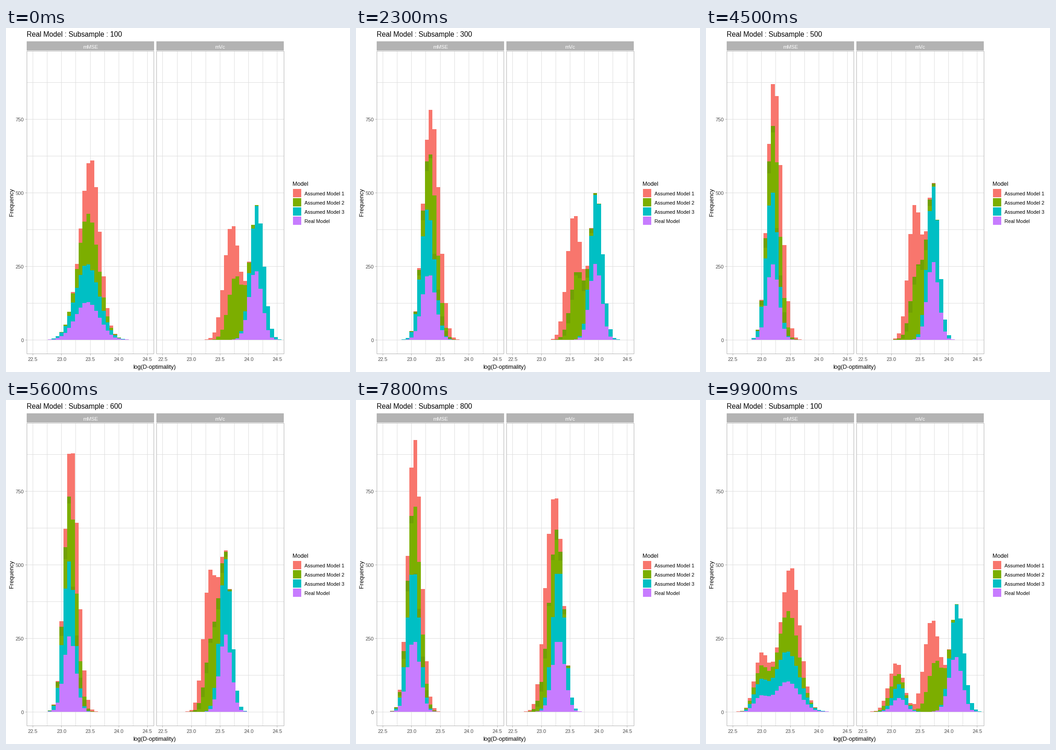
Animation, 748 px wide and 748 px high, one loop 10000 ms. Source, as a matplotlib script:

```python
import numpy as np
import matplotlib.pyplot as plt
from matplotlib.animation import FuncAnimation
from matplotlib.patches import Rectangle

SIZE = 748
PX = 0.72                        # points per pixel at 100 dpi
RED, GREEN, TEAL, PURPLE = "#F8766D", "#7CAE00", "#00BFC4", "#C77CFF"
OLIVE, GREY, GRID, INK = "#729F05", "#B3B3B3", "#DEDEDE", "#4D4D4D"
MODELS = {"Assumed Model 1": RED, "Assumed Model 2": GREEN,
          "Assumed Model 3": TEAL, "Real Model": PURPLE}

BINS = np.arange(30)
BIN_W = 8.37
SHIFT = 282.4                    # distance between the two panels
Y0, Y_SCALE = 678, 0.64
RUNS = 1000                      # simulations behind each model
STATES = 9

# Per model: start of the mean, its slope and bend per step, its early extra,
# the base spread and its early extra, all in bins.
MMSE = [(14.22, -0.758, -0.030, 0.00, 1.61, 0.1),
        (13.22, -0.902, 0.000, 0.00, 1.63, 0.5),
        (11.30, -0.700, 0.000, 1.36, 1.53, 1.4),
        (12.10, -0.785, 0.000, 0.66, 1.53, 1.4)]
MVC = [(15.79, -0.90, -0.033, 0, 1.60, 0),
       (17.54, -1.00, -0.044, 0, 1.67, 0),
       (23.50, -1.30, -0.080, 0, 1.55, 0),
       (22.67, -1.10, -0.091, 0, 1.50, 0)]


def bell(k, start, slope, bend, extra, spread, wide):
    """Expected bin counts of one model at subsample step k."""
    mean = start + slope * k + bend * k**2 + extra * np.exp(-2 * k)
    sd = spread + 0.011 * (k - 4) ** 2 + wide * np.exp(-k)
    counts = RUNS / (sd * np.sqrt(2 * np.pi)) * np.exp(-((BINS - mean) / sd) ** 2 / 2)
    return np.round(counts)


def layers(table, k, two_sided):
    """Stacked tops of the four models, then the low and high edge of the overlap."""
    counts = np.array([bell(k, *row) for row in table])
    tops = np.cumsum(counts[::-1], axis=0)[::-1]
    green = counts[1]
    slope = np.gradient(green)
    depth = np.minimum(np.abs(slope) / 2, green) * (2 <= k <= 7)
    low = np.where(two_sided & (slope < 0), tops[2], tops[1] - depth)
    return np.vstack([tops, low, low + depth])


DATA = [[layers(table, k, table is MMSE) for k in range(STATES)]
        for table in (MMSE, MVC)]
STEPS = [6, 6] + [5] * 7         # frames in each change
HOLD = 6                         # still frames between changes
STARTS = np.cumsum([HOLD] + [n + HOLD for n in STEPS[:-1]])

plt.rcParams["font.family"] = "Liberation Sans"
fig = plt.figure(figsize=(SIZE / 100, SIZE / 100), dpi=100, facecolor="white")
ax = fig.add_axes([0, 0, 1, 1])
ax.set(xlim=(0, SIZE), ylim=(SIZE, 0))
ax.axis("off")


def line(x, y, color, z=1):
    """One-pixel line through the centres of whole pixels."""
    ax.plot(np.floor(x) + 0.5, np.floor(y) + 0.5, color=color, lw=PX, zorder=z,
            snap=False, solid_capstyle="projecting", solid_joinstyle="miter")


def label(x, y, s, size, color="black", ha="center", va="center_baseline", **kw):
    return ax.text(x, y, s, fontsize=size * PX, color=color, ha=ha, va=va, **kw)


def box(x, y, w, h, color):
    ax.add_patch(Rectangle((x, y), w, h, fc=color, lw=0, antialiased=False))


def draw_panel(shift, name):
    left, right = 45 + shift, 321.6 + shift
    box(left, 29, right - left, 20, GREY)
    label((left + right) / 2, 40.5, name, 11, "white")
    for i in range(9):
        x = 58.5 + shift + 31.13 * i
        line([x, x], [51, 707], GRID)
        if i % 2 == 0:
            line([x, x], [709, 711], GREY)
            label(x, 720, f"{22.5 + i / 4:.1f}", 11, INK)
    for i in range(8):
        y = Y0 - 80 * i
        line([left, right], [y, y], GRID)
    line([left, right, right, left, left], [50, 50, 708, 708, 50], GREY, 5)

    edges = 66 + shift + BIN_W * np.arange(len(BINS) + 1)
    flat = np.full(len(BINS), float(Y0))
    return [ax.stairs(flat, edges, baseline=flat, fill=True, color=c, lw=0,
                      antialiased=False, zorder=3 + j * 0.1)
            for j, c in enumerate([RED, GREEN, OLIVE, TEAL, PURPLE])]


bars = [draw_panel(0, "mMSE"), draw_panel(SHIFT, "mVc")]

for i in range(4):
    y = Y0 - 160 * i
    line([42, 44], [y, y], GREY)
    label(39, y + 1, str(250 * i), 11, INK, "right")

title = label(45, 19, "", 15.5, ha="left", va="baseline")
label(323, 737, "log(D-optimality)", 12.8)
label(13.5, 378.5, "Frequency", 12.9, rotation=90, va="center")
label(623, 338, "Model", 12.6, ha="left")
for i, (name, color) in enumerate(MODELS.items()):
    box(624, 350 + 20 * i, 18, 18, color)
    label(649, 360 + 20 * i, name, 10.8, ha="left")


def progress(frame):
    """Previous state, next state and the share of the way between them."""
    if frame < HOLD:
        return 0, 0, 1
    k = np.searchsorted(STARTS, frame, side="right") - 1
    return k, (k + 1) % STATES, min(1, (frame - STARTS[k] + 1) / STEPS[k])


def update(frame):
    a, b, t = progress(frame)
    title.set_text(f"Real Model : Subsample : {100 * ((b if t > 0.5 else a) + 1)}")
    for states, (red, green, olive, teal, purple) in zip(DATA, bars):
        y = Y0 - Y_SCALE * (states[a] * (1 - t) + states[b] * t)
        for patch, top in zip([red, green, teal, purple], y):
            patch.set_data(values=top)
        olive.set_data(values=y[5], baseline=y[4])
    return []


anim = FuncAnimation(fig, update, frames=100, interval=100, repeat=True,
                     repeat_delay=0, blit=False)
plt.show()
```
